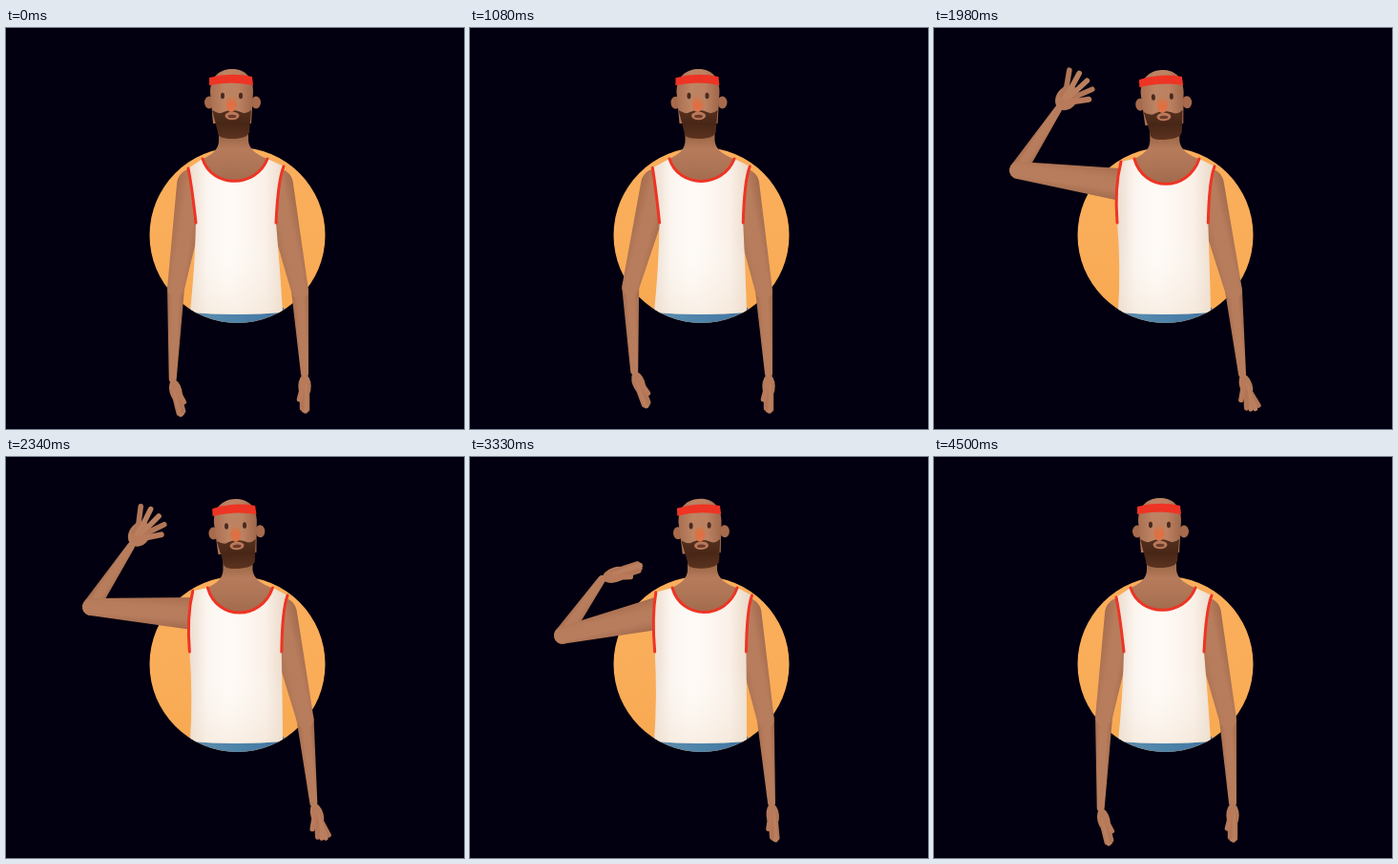
Recreate the animation shown at these times as an HTML page with a canvas. Size 480 by 420 pixels, loop 4.53 s.

```html
<!DOCTYPE html>
<html lang="en">
<head>
<meta charset="utf-8">
<title>Waving man</title>
<style>
html, body { margin: 0; width: 100%; height: 100%; overflow: hidden; background: #020010; }
canvas { display: block; }
</style>
</head>
<body>
<canvas id="stage" width="480" height="420"></canvas>
<script>
const c = document.getElementById('stage').getContext('2d');
const LOOP = 4530, STEP = 30, RED = '#ee3424', SKIN = '#b67b5b', RAD = Math.PI / 180;

// time, upper-arm angle and length, forearm angle and length,
// hand angle, palm facing, finger spread, sway, right wrist shift
const KEYS = [
  [0, 99.4, 110, 92, 95, 76, -.4, 0, 0, 0],
  [840, 99.4, 110, 92, 95, 76, -.4, 0, 0, 0],
  [1080, 104.5, 111, 87.4, 88, 70, -.4, 0, 2.5, 0],
  [1320, 145, 105, 20, 64, 0, .2, .2, 3, 5],
  [1590, 188, 109, -55, 74, -45, 1, .9, 3, 10],
  [1770, 188, 109, -62, 76, -78, 1, 1, 3, 10],
  [1980, 187.9, 109, -56.7, 76.5, -52, 1, 1, 3.3, 10],
  [2160, 186, 108, -60, 76, -78, 1, 1, 4, 10],
  [2400, 183, 107, -56, 77, -50, 1, 1, 4.6, 9],
  [2670, 179.5, 106, -59.5, 79, -76, 1, 0, 5, 7],
  [3330, 167, 101.6, -55, 72, -18, .5, 0, 5, 3],
  [3540, 137, 101, 20, 56, 40, -.3, 0, 4, 1],
  [3750, 106.5, 102, 91, 60, 66, -.7, 0, 2.5, 0],
  [4200, 99.4, 110, 92, 95, 76, -.4, 0, 0, 0]
];
KEYS.push([LOOP, ...KEYS[0].slice(1)]);

// Monotone cubic interpolation: smooth passage, no overshoot
function slope(i, k) {
  const a = KEYS[i - 1], b = KEYS[i], d = KEYS[i + 1];
  if (!a || !d) return 0;
  const p = (b[k] - a[k]) / (b[0] - a[0]), q = (d[k] - b[k]) / (d[0] - b[0]);
  return p * q > 0 ? 2 * p * q / (p + q) : 0;
}

function poseAt(t) {
  const i = KEYS.findIndex((key, n) => n === KEYS.length - 2 || t < KEYS[n + 1][0]);
  const a = KEYS[i], b = KEYS[i + 1], h = b[0] - a[0], u = (t - a[0]) / h, v = 1 - u;
  return a.slice(1).map((from, n) => {
    const k = n + 1;
    return from * v * v * (1 + 2 * u) + b[k] * u * u * (3 - 2 * u)
      + h * u * v * (v * slope(i, k) - u * slope(i + 1, k));
  });
}

function gradient(x0, y0, x1, y1, ...colors) {
  const g = c.createLinearGradient(x0, y0, x1, y1);
  colors.forEach((color, i) => g.addColorStop(i / (colors.length - 1), color));
  return g;
}

function fill(path, color) {
  c.fillStyle = color;
  c.fill(new Path2D(path));
}

function stroke(path, color, width) {
  c.strokeStyle = color;
  c.lineWidth = width;
  c.stroke(new Path2D(path));
}

function oval(x, y, rx, ry, color) {
  c.fillStyle = color;
  c.beginPath();
  c.ellipse(x, y, rx, ry, 0, 0, 7);
  c.fill();
}

const along = (p, angle, length) =>
  [p[0] + Math.cos(angle * RAD) * length, p[1] + Math.sin(angle * RAD) * length];

function limb(a, ra, b, rb) {
  const angle = Math.atan2(b[1] - a[1], b[0] - a[0]), q = Math.PI / 2;
  const nx = -Math.sin(angle) * ra, ny = Math.cos(angle) * ra;
  c.fillStyle = gradient(a[0] + nx, a[1] + ny, a[0] - nx, a[1] - ny,
    '#a66d4f', '#b77c5b', '#b87d5d', '#a26a4d');
  c.beginPath();
  c.arc(...a, ra, angle + q, angle + 3 * q);
  c.arc(...b, rb, angle - q, angle + q);
  c.fill();
}

function hand(wrist, angle, facing, spread, scale) {
  c.save();
  c.translate(...wrist);
  c.rotate(angle * RAD);
  c.scale(scale, scale);
  const wide = Math.abs(facing);
  oval(15, 0, 14, 5 + 6 * wide, SKIN);
  for (let i = -1.5; i < 2; i++) {
    const a = i * .33 * spread, y = i * 5 * facing, length = 20 - Math.abs(i + .3) * 2;
    stroke(`M14 ${y * .8}L24 ${y}l${Math.cos(a) * length} ${Math.sin(a) * length}`,
      i % 1 && Math.abs(i) > 1 ? '#b27657' : '#ba7f5e', 5.6);
  }
  const side = Math.sign(facing) || 1;
  stroke(`M12 ${side * 4 * wide}L${30 - 2 * spread} ${side * (3 + 8 * wide + 8 * spread)}`, '#b87a5a', 6);
  c.restore();
}

function arm(shoulder, elbow, wrist) {
  limb(elbow, 9, wrist, 4);
  limb(shoulder, 17, elbow, 9);
}

function shirt(sway, raise) {
  const lx = 191 + 5 * raise, ly = 147 - 7 * raise, rx = 291 + .9 * sway;
  const inL = 206 + 1.2 * sway, inR = 274 + 1.2 * sway, dip = 168 + 4 * raise;
  const pitL = 199 - 7 * raise, pitR = 283 + 1.3 * sway;
  const neck = `C${inL + 10} ${dip} ${inR - 12} ${dip} ${inR} 137`;
  const holeL = `Q${195 - 6 * raise} 167 ${pitL} 204`;
  const holeR = `Q${285 + sway} 160 ${pitR} 204`;
  const outline = `M${inL} 137${neck}L${rx} 145${holeR}Q${287 + .6 * sway} 250 290 298`
    + `Q242 302 193 298Q${198 - 2 * raise} 250 ${pitL} 204Q${195 - 6 * raise} 167 ${lx} ${ly}Z`;
  fill(outline, gradient(190, 0, 293, 0, '#ead9ca', '#fbf5ef', '#fffbf7', '#fdf7f1', '#faf0e7', '#ead8c7'));
  fill(outline, gradient(0, 135, 0, 300, '#fff0', '#fff0', '#f0dfcd70'));
  stroke(`M${inL} 137${neck}`, RED, 3);
  stroke(`M${lx} ${ly}${holeL}`, RED, 3);
  stroke(`M${rx} 145${holeR}`, RED, 3);
}

function head(sway, raise) {
  c.save();
  c.translate(237 + sway, 80 + raise);
  c.rotate(-.05 * raise);
  oval(-24, -2, 5, 6.5, '#a76a4c');
  oval(25, -2, 5, 6.5, '#a76a4c');
  fill('M-23 -13C-23 -30-12 -37 0 -37S22 -30 22 -13L20 20H-20Z',
    gradient(-23, 0, 22, 0, '#a96f52', '#bd8463', '#bb8161', '#a0674b'));
  fill('M-21 6Q-13 11-9 8Q0 4 9 8Q14 11 20 6L18 29Q16 36 0 36T-15 29Z',
    gradient(0, 5, 0, 36, '#55301e', '#482616', '#5c3320'));
  fill('M-24 -28Q-1 -34 21 -29L22 -20Q-1 -25-24 -20Z', RED);
  oval(-10, -9, 2, 3.3, '#4a2a20');
  oval(9, -9, 2, 3.3, '#4a2a20');
  oval(-1, 0, 5.5, 8, gradient(0, -8, 0, 8, '#c77e55', '#df6f42', '#d9764b'));
  oval(0, 12, 7.5, 4.2, '#b9795a');
  oval(0, 12.5, 4.5, 1.8, '#6d3b2a');
  c.restore();
}

function draw(t) {
  const [upper, upperLen, fore, foreLen, palm, facing, spread, sway, shift] = poseAt(t);
  const raise = (upper - 99.4) / 88.5;
  c.fillStyle = '#020010';
  c.fillRect(0, 0, 480, 420);
  oval(242.5, 217, 92, 92, gradient(0, 125, 0, 309, '#fbae5b', '#faad59', '#f8a950'));

  const shoulder = [196, 164], elbow = along(shoulder, upper, upperLen);
  const wrist = along(elbow, fore, foreLen);
  const wristR = [313 + shift, 362];
  hand(wrist, palm, facing, spread, .88 + .12 * Math.max(0, raise));
  arm(shoulder, elbow, wrist);
  hand(wristR, 90 - shift * 1.7, .4, Math.max(0, shift - 5) * .1, .9);
  arm([284 + .9 * sway, 164], [308 + .6 * shift, 275], wristR);

  // The circle crops the lower body
  c.save();
  c.beginPath();
  c.rect(0, 0, 480, 217);
  c.arc(242.5, 217, 92, 0, Math.PI);
  c.clip();
  fill('M193 293H291V310H193Z', gradient(195, 0, 289, 0, '#5d8eae', '#4e83aa', '#4475a0'));
  const n = sway;
  fill(`M${223 + n} 100V118Q${223 + n} 130 ${206 + n} 137L198 150L210 172H270L286 150`
    + `L${274 + n} 137Q${255 + n} 130 ${254 + n} 118V100Z`,
    gradient(0, 108, 0, 165, '#92603f', '#b67b5b', '#ad7455', '#a0694c'));
  shirt(sway, raise);
  c.restore();
  head(sway, raise);
}

c.lineCap = c.lineJoin = 'round';
function tick() {
  draw(Math.floor(performance.now() % LOOP / STEP) * STEP);
  requestAnimationFrame(tick);
}
tick();
</script>
</body>
</html>
```
